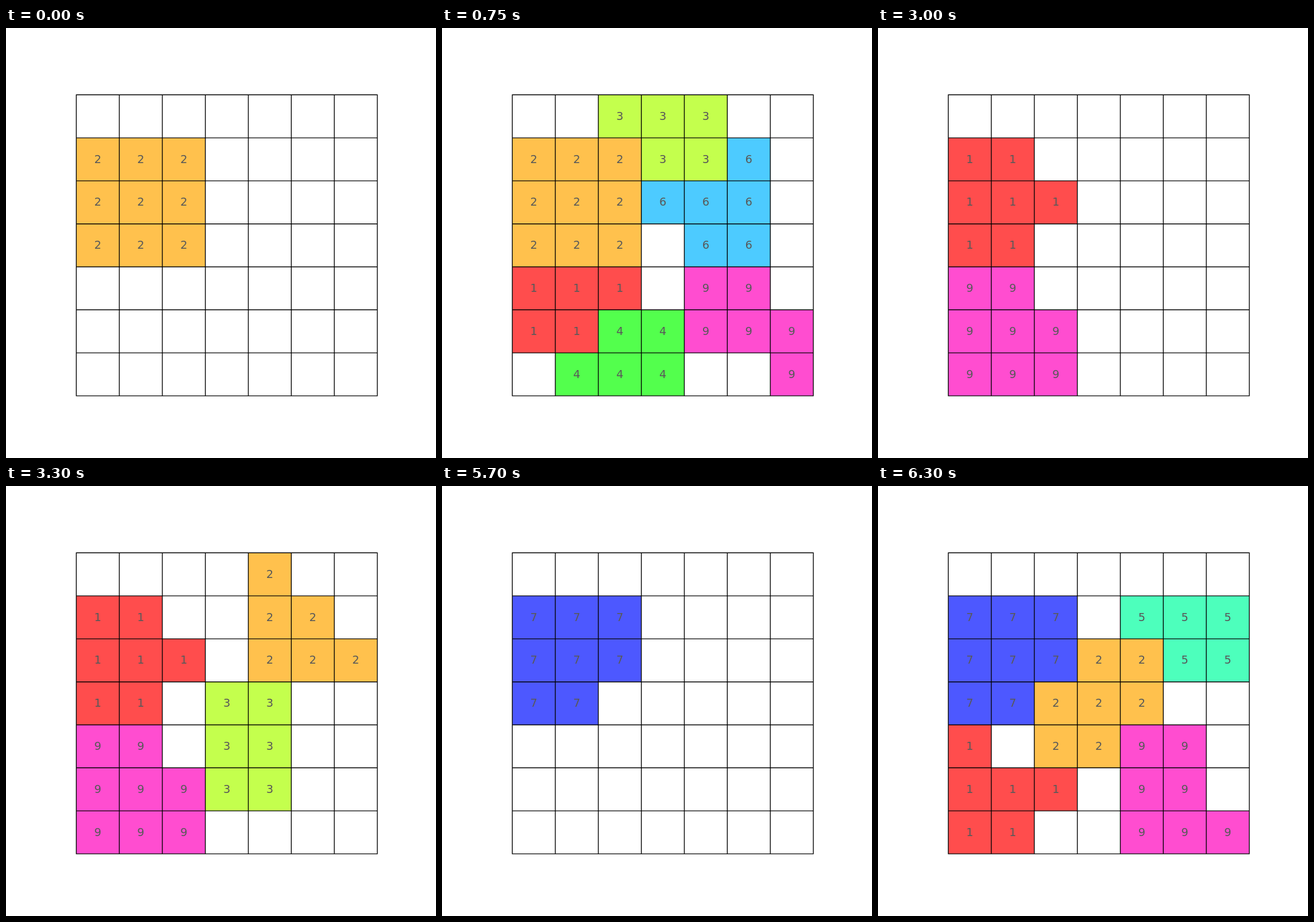
Write an HTML page that moves like this. It is 748 by 748 pixels and loops after 8 s.

```html
<!DOCTYPE html>
<html lang="en">
<head>
<meta charset="utf-8">
<title>Packing a grid</title>
<style>
html, body { margin: 0; width: 100%; height: 100%; overflow: hidden; background: #fff; }
svg { display: block; width: 100vw; height: 100vh; }
text { font: 19.4px "DejaVu Sans", sans-serif; fill: #595959; text-anchor: middle; }
</style>
</head>
<body>
<svg viewBox="0 0 748 748"><g id="cells"></g><path id="grid" fill="none" stroke="#000" stroke-width="1.39" stroke-linecap="square"/></svg>
<script>
const LOOP = 8000, STEP = 150;
const N = 7, SIZE = 74.8, LEFT = 122.3, TOP = 116.3;
const COLORS = {
  1: '#ff4d4d', 2: '#ffc14d', 3: '#c4ff4d', 4: '#53ff4d',
  5: '#4dffbc', 6: '#4dcbff', 7: '#4d58ff', 9: '#ff4dd0'
};

// Each board places its pieces one per step, in the given order.
const BOARDS = [
  { start: 0, order: '216943', rows: ['..333..', '222336.', '222666.', '222.66.', '111.99.', '1144999', '.444..9'] },
  { start: 2850, order: '1932754', rows: ['.5552..', '115522.', '111.222', '11.3377', '99.3377', '9993377', '999..44'] },
  { start: 5700, order: '72195', rows: ['.......', '777.555', '7772255', '77222..', '1.2299.', '111.99.', '11..999'] }
];

function make(tag, attrs, parent) {
  const el = document.createElementNS('http://www.w3.org/2000/svg', tag);
  for (const name in attrs) el.setAttribute(name, attrs[name]);
  return parent.appendChild(el);
}

const layer = document.getElementById('cells');
const cells = Array.from({ length: N * N }, (_, i) => {
  const x = LEFT + (i % N) * SIZE, y = TOP + Math.floor(i / N) * SIZE;
  const g = make('g', { visibility: 'hidden' }, layer);
  const rect = make('rect', { x, y, width: SIZE, height: SIZE }, g);
  const label = make('text', { x: x + SIZE / 2, y: y + SIZE / 2 + 6 }, g);
  return { g, rect, label };
});

let lines = '';
for (let k = 0; k <= N; k++) {
  const d = k * SIZE;
  lines += `M${LEFT + d} ${TOP}v${N * SIZE}M${LEFT} ${TOP + d}h${N * SIZE}`;
}
document.getElementById('grid').setAttribute('d', lines);

let shown = '';
function render(time) {
  const board = BOARDS.findLast(b => b.start <= time);
  const placed = board.order.slice(0, Math.floor((time - board.start) / STEP) + 1);
  const state = board.start + ':' + placed;
  if (state === shown) return;
  shown = state;
  cells.forEach(({ g, rect, label }, i) => {
    const id = board.rows[Math.floor(i / N)][i % N];
    const visible = placed.includes(id);
    g.setAttribute('visibility', visible ? 'visible' : 'hidden');
    if (!visible) return;
    rect.setAttribute('fill', COLORS[id]);
    label.textContent = id;
  });
}

const origin = performance.now();
function tick() {
  render((performance.now() - origin) % LOOP);
  requestAnimationFrame(tick);
}
tick();
</script>
</body>
</html>
```
